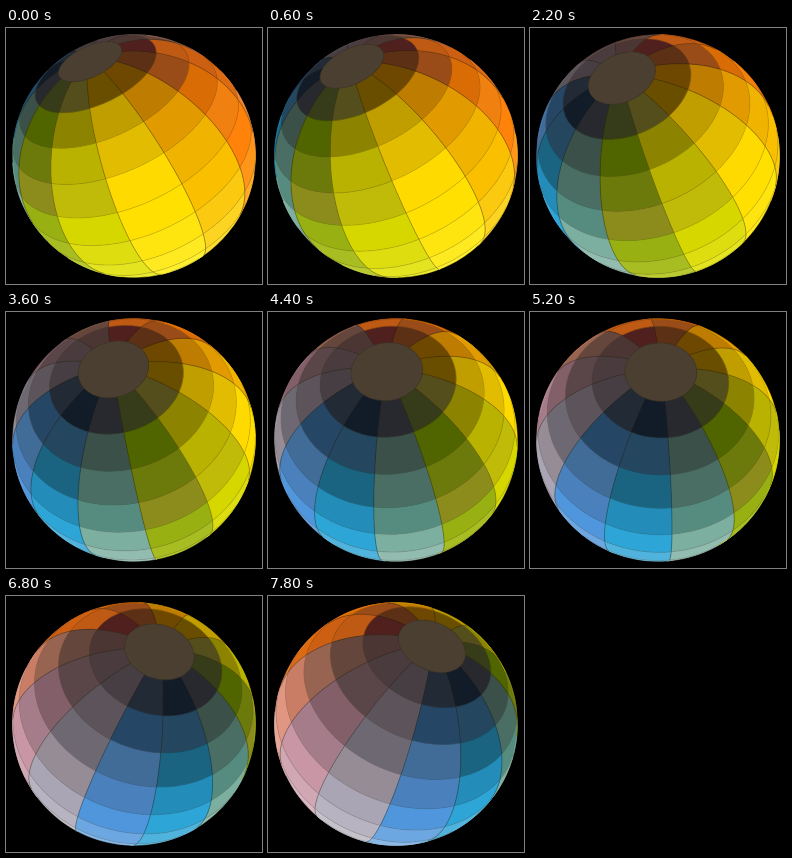
Write an HTML page with a canvas that moves like this. It is 256x256 px and loops after 8 s.

```html
<!DOCTYPE html>
<html lang="en">
<head>
<meta charset="utf-8">
<title>Rotating colour sphere</title>
<style>
  html, body { margin: 0; width: 100%; height: 100%; overflow: hidden; background: #000; }
  canvas { display: block; width: 100%; height: 100%; }
</style>
</head>
<body>
<canvas id="stage" width="256" height="256"></canvas>
<script>
const ctx = document.getElementById('stage').getContext('2d');
const RAD = Math.PI / 180;
const LOOP = 8000, STEP = 200;
const CENTER = 128, RADIUS = 121.3;
const RING = 15, SECTOR = 30, FIRST_MERIDIAN = 2.5;
const LAST_RING = 9;
const CAP_COLOR = '#4b3f32';

// Perspective: camera distance in sphere radii, scaled so the rim stays at RADIUS.
const CAMERA = 6;
const FOCAL = Math.sqrt(CAMERA * CAMERA - 1);

// One row per hue, from the dark pole down to the equator.
const HUES = [
  '#28292e #3a5048 #4b6e64 #568c80 #7dafa0',
  '#363c19 #506400 #6b7a0a #8c8c1c #98b012',
  '#544d1c #8c8400 #b9b200 #c0ba08 #d7d700',
  '#694e00 #c09e00 #e1bc00 #ffda00 #ffe000',
  '#6e4800 #be7c00 #e19b00 #f0b400 #fac000',
  '#5c3014 #9a4c18 #d96c05 #f0800f #ff820a',
  '#50201e #be5a14 #cd5f12 #dc6a12 #f08228',
  '#4c3634 #64463c #966450 #c87d64 #e19682',
  '#4a3c3e #5a4648 #825f69 #a57d8a #c896a5',
  '#463e42 #5c545a #6e6872 #968c96 #aaa5b4',
  '#222a36 #264666 #426c98 #4a80bc #5096dc',
  '#121c28 #24465e #1a6482 #238cb9 #2da5d7'
].map(row => row.split(' '));

// Fixed spin axis and a perpendicular direction leaning toward the viewer.
const AXIS = [0, 0.779, 0.627];
const FRONT = [0, -0.627, 0.779];
const TILT_COS = Math.cos(20.4 * RAD), TILT_SIN = Math.sin(20.4 * RAD);

const cross = (a, b) => [
  a[1] * b[2] - a[2] * b[1],
  a[2] * b[0] - a[0] * b[2],
  a[0] * b[1] - a[1] * b[0]
];

function orientation(phi) {
  const side = [Math.sin(phi), FRONT[1] * Math.cos(phi), FRONT[2] * Math.cos(phi)];
  const pole = AXIS.map((v, i) => TILT_COS * v + TILT_SIN * side[i]);
  const outward = AXIS.map((v, i) => TILT_COS * side[i] - TILT_SIN * v);
  return { pole, outward, right: cross(pole, outward) };
}

function project(body, colat, lon) {
  const c = Math.cos(colat * RAD), s = Math.sin(colat * RAD);
  const cl = s * Math.cos(lon * RAD), sl = s * Math.sin(lon * RAD);
  const [x, y, z] = body.pole.map((v, i) => c * v + cl * body.outward[i] + sl * body.right[i]);
  const visible = z >= 1 / CAMERA;
  // Points behind the horizon slide onto the rim.
  const k = RADIUS * (visible ? FOCAL / (CAMERA - z) : 1 / Math.hypot(x, y));
  return { x: CENTER + x * k, y: CENTER - y * k, visible };
}

function fillShape(points, color) {
  if (!points.some(p => p.visible)) return;
  ctx.beginPath();
  points.forEach(p => ctx.lineTo(p.x, p.y));
  ctx.closePath();
  ctx.fillStyle = ctx.strokeStyle = color;
  ctx.lineWidth = 0.5;
  ctx.fill();
  ctx.stroke();
}

function fillCell(body, ring, lon, color) {
  const top = ring * RING, bottom = top + RING, n = 10;
  const points = [];
  const edge = (c0, l0, c1, l1) => {
    for (let i = 0; i < n; i++) {
      points.push(project(body, c0 + (c1 - c0) * i / n, l0 + (l1 - l0) * i / n));
    }
  };
  edge(top, lon, top, lon + SECTOR);
  edge(top, lon + SECTOR, bottom, lon + SECTOR);
  edge(bottom, lon + SECTOR, bottom, lon);
  edge(bottom, lon, top, lon);
  fillShape(points, color);
}

function strokeCurve(count, pointAt, style, width) {
  ctx.beginPath();
  let open = false;
  for (let i = 0; i <= count; i++) {
    const p = pointAt(i / count);
    if (p.visible) open ? ctx.lineTo(p.x, p.y) : ctx.moveTo(p.x, p.y);
    open = p.visible;
  }
  ctx.strokeStyle = style;
  ctx.lineWidth = width;
  ctx.stroke();
}

function cellColor(row, ring) {
  if (ring <= 5) return row[ring - 1];
  const white = (ring - 5) * 0.16;
  const mixed = [1, 3, 5].map(i => {
    const v = parseInt(row[4].slice(i, i + 2), 16);
    return Math.round(v + (255 - v) * white * (v < 40 ? 0.4 : 1));
  });
  return `rgb(${mixed})`;
}

function draw(step) {
  const body = orientation((-94 + 3.75 * step) * RAD);
  ctx.fillStyle = '#000';
  ctx.fillRect(0, 0, 256, 256);

  const meridians = HUES.map((_, k) => FIRST_MERIDIAN + k * SECTOR);
  HUES.forEach((row, k) => {
    for (let ring = 1; ring <= LAST_RING; ring++) {
      fillCell(body, ring, meridians[k], cellColor(row, ring));
    }
  });
  const cap = Array.from({ length: 72 }, (_, i) => project(body, RING, i * 5));
  fillShape(cap, CAP_COLOR);

  for (let ring = 1; ring <= LAST_RING; ring++) {
    strokeCurve(120, t => project(body, ring * RING, t * 360), 'rgba(50,45,20,.25)', 0.7);
  }
  meridians.forEach(lon => {
    strokeCurve(60, t => project(body, RING + t * 130, lon), 'rgba(40,36,16,.45)', 0.8);
  });
}

let shown = -1;
function tick() {
  const step = Math.floor(performance.now() % LOOP / STEP);
  if (step !== shown) draw(shown = step);
  requestAnimationFrame(tick);
}
tick();
</script>
</body>
</html>
```
